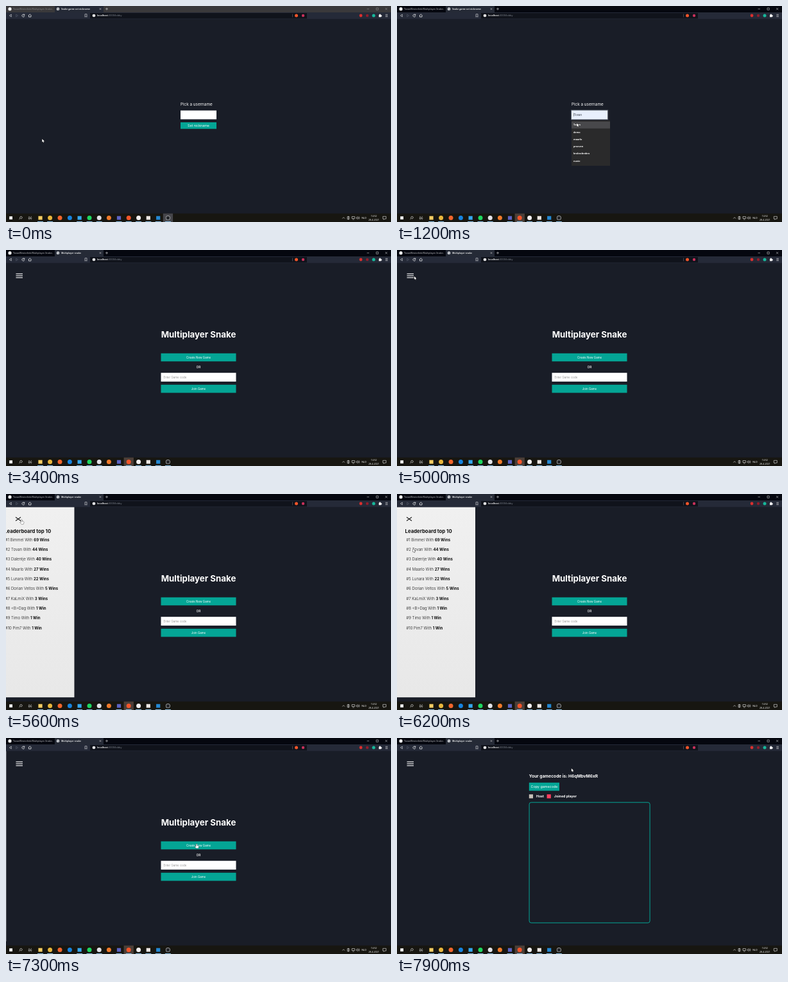
Write an HTML page with a canvas that moves like this. It is 600 px wide and 338 px high and loops after 8000 ms.

```html
<!DOCTYPE html>
<html lang="en">
<head>
<meta charset="utf-8">
<title>Multiplayer Snake</title>
<style>
html, body { margin: 0; height: 100%; overflow: hidden; background: #191d27; }
canvas { display: block; width: 600px; height: 338px; }
</style>
</head>
<body>
<canvas id="stage"></canvas>
<script>
const LOOP = 8000;
const ACTIVE = 500, FOCUS = 700, PICK = 1500, SUBMIT = 1950, LOBBY = 2800;
const MENU_OPEN = 5310, MENU_CLOSE = 6835, SLIDE = 500, GAME = 7580;
const TEAL = '#04a595', PAGE = '#191d27', PANEL_WIDTH = 122;
const UI = '"Open Sans", sans-serif', WEB = 'Inter, sans-serif';

const stage = document.getElementById('stage');
const g = stage.getContext('2d');
const ratio = window.devicePixelRatio || 1;
stage.width = 600 * ratio;
stage.height = 338 * ratio;

function rect(x, y, w, h, fill) {
  g.fillStyle = fill;
  g.fillRect(x, y, w, h);
}

function dot(x, y, r, fill) {
  g.fillStyle = fill;
  g.beginPath();
  g.arc(x, y, r, 0, 7);
  g.fill();
}

function stroke(path, color, width = 0.7) {
  g.strokeStyle = color;
  g.lineWidth = width;
  g.stroke(new Path2D(path));
}

// y is the vertical middle of the lowercase line; returns the x where the text ends
function text(str, x, y, size, { color = '#fff', weight = 400, font = WEB, align = 'left' } = {}) {
  g.font = `${weight} ${size}px ${font}`;
  g.textAlign = align;
  g.fillStyle = color;
  g.fillText(str, x, y + size * 0.34);
  return x + g.measureText(str).width;
}

const label = (str, x, y, size = 3.7, color = '#fff', weight = 400, align = 'left') =>
  text(str, x, y, size, { color, weight, align, font: UI });

function button(str, x, y, w, h, size) {
  rect(x, y, w, h, TEAL);
  text(str, x + w / 2, y + h / 2, size, { align: 'center' });
}

// CSS "ease" timing, cubic-bezier(.25, .1, .25, 1)
function ease(p) {
  if (p <= 0) return 0;
  if (p >= 1) return 1;
  let lo = 0, hi = 1, s;
  for (let i = 0; i < 20; i++) {
    s = (lo + hi) / 2;
    const x = 0.75 * s * (1 - s) + s ** 3;
    if (x < p) lo = s; else hi = s;
  }
  return 0.3 * s * (1 - s) ** 2 + 3 * s * s * (1 - s) + s ** 3;
}

function tabTitle(t) {
  if (t < SUBMIT) return 'Snake game set nickname';
  return t < LOBBY ? 'localhost:3000/lobby' : 'Multiplayer snake';
}

function browser(t) {
  const active = t >= ACTIVE, loading = t >= SUBMIT && t < LOBBY;
  const dim = active ? '#c8c9cc' : '#8d8d8f';
  rect(0, 0, 600, 10, active ? '#05070f' : '#3a393b');
  rect(76, 0, 76, 10, '#252a36');
  dot(6, 4.7, 2.6, '#f2f2f2');
  g.save();
  g.beginPath();
  g.rect(0, 0, 73, 10);
  g.clip();
  label('TovanWesterlink/Multiplayer-Snake a', 11, 4.7, 3.7, dim);
  g.restore();
  dot(81, 4.7, 2.4, '#d5d8dc');
  stroke('M79 4h2l1 1-1 2M82 2.5l1 1.5', '#59606c', 0.5);
  label(tabTitle(t), 86, 4.7, 3.6, '#fff', 600);
  stroke('M145.8 3.4l2.4 2.4m0-2.4l-2.4 2.4M155 4.6h4m-2-2v4', '#d8d8d8', 0.6);
  stroke('M562.5 4.7h3.4M577 3h3.2v3.2H577zM591 3l3.2 3.2m0-3.2L591 6.2', dim, 0.6);

  rect(0, 10, 600, 10.4, '#252a38');
  rect(131, 11, 338, 8.6, '#10131b');
  stroke('M8.3 13l-3 2 3 2z', '#e5e6e8', 0.6);
  stroke('M15.7 13l3 2-3 2z', '#596070', 0.6);
  if (loading) stroke('M25 13l4 4m0-4l-4 4', '#fff', 0.8);
  else stroke('M28.6 13.9a2 2 0 1 0 .3 1.7M28.8 12.6v1.7h-1.7', '#fff', 0.7);
  stroke('M34.8 15l2.4-2.2 2.4 2.2M35.5 14.7v2.4h3.4v-2.4', '#fff', 0.7);
  stroke('M123 12.7h3v4.6l-1.5-1.2-1.5 1.2z', '#e5e6e8', 0.6);
  dot(137, 15, 2.3, '#fff');
  stroke('M137 14.7v1.5M137 13.5v.6', '#10131b', 0.6);
  const end = label('localhost', 142, 15.1, 3.9, '#fff', 600);
  label(':3000/lobby', end, 15.1, 3.9, '#858b94');
  stroke('M446.5 12.5v5', '#747983', 0.5);
  dot(452.5, 15, 2.5, '#f4552a');
  dot(463, 15, 2.2, '#c9315c');
  dot(553, 15, 2.4, '#d9302f');
  dot(563, 15, 2.2, '#8f1d2c');
  dot(573, 15, 2.5, '#17b79a');
  rect(581, 13.6, 3.7, 3.7, '#fff');
  dot(582.8, 13.3, 0.9, '#fff');
  dot(585, 15.4, 0.9, '#fff');
  stroke('M591.3 13.3h3.6m-3.6 1.7h3.6m-3.6 1.7h3.6', '#e2e3e5', 0.6);
}

// x, colour, shape (s = square), running
const APPS = [
  [53.5, '#f5cd63', 's', 1], [68.6, '#e9b63c', 'c', 1], [84, '#f1652c', 'c', 0],
  [99.4, '#1583e0', 'c', 0], [114.6, '#35a8ee', 's', 1], [130, '#1ed760', 'c', 1],
  [145.2, '#e4e4ea', 'c', 1], [160.4, '#f07a2b', 'c', 0], [176, '#5b63c4', 's', 1],
  [191.2, '#f4552a', 'c', 1], [206.6, '#f4f1f2', 'c', 1], [221.8, '#eee8e4', 's', 1],
  [237.2, '#2489d4', 's', 1], [252.4, '#b9bbbd', 'c', 1]
];

function taskbar(t) {
  rect(0, 324.7, 600, 13.3, '#171611');
  rect(t < ACTIVE ? 244.8 : 183.6, 324.7, 15.3, 13.3, t < ACTIVE ? '#45454a' : '#4b3f39');
  rect(5.2, 329.2, 4.8, 4.8, '#fff');
  stroke('M20.5 333.8l1.6-1.7a1.7 1.7 0 1 1 .6.5', '#e8e8e8', 0.7);
  stroke('M35.3 329.6h1.3m2.2 0h1.2M35.3 333.8h1.3m2.2 0h1.2M35.3 331h3.2v1.8h-3.2zM39.8 331v1.8', '#ddd', 0.6);
  for (const [x, color, shape, running] of APPS) {
    if (shape === 's') rect(x - 3.1, 328.7, 6.2, 5.8, color);
    else dot(x, 331.6, 3.5, color);
    if (running) rect(x - 4.5, 337, 9, 1, '#86bfe6');
  }
  dot(252.4, 331.6, 2.8, '#24262a');
  stroke('M524.2 332.6l1.9-1.9 1.9 1.9', '#eee', 0.6);
  stroke('M532 329.6h3v4h-3zM533.5 328.8v5.6M539 329.5h4.4v3H539zM540 334h2.6', '#e5e5e5', 0.6);
  stroke('M545.8 330.8h1l1.3-1.2v4l-1.3-1.2h-1zM549.2 330.2q1 1.4 0 2.8M550.2 329.5q1.6 2.1 0 4.2', '#e5e5e5', 0.5);
  label('NLD', 558, 331.7, 3.8, '#fff', 400, 'center');
  label('14:52', 573.3, 328.9, 3.6, '#fff', 400, 'center');
  label('28-4-2021', 573.3, 334.4, 3.6, '#fff', 400, 'center');
  stroke('M587.3 329.3h5v3.8h-2.2l-1.2 1.2v-1.2h-1.6z', '#eee', 0.6);
}

const SUGGESTIONS = ['Tovan', 'demo', 'maarlo', 'proeven', 'brobrobrobro', 'nuvie'];

function nicknamePage(t) {
  const open = t >= FOCUS && t < PICK, filled = t >= 1100;
  text('Pick a username', 272, 153.8, 6.35);
  button('Set nickname', 272, 182, 56, 10.3, 5.3);
  if (open) rect(271, 162.5, 58.2, 15.7, '#5d626d');
  rect(272, 163.5, 56, 13.8, filled ? '#e8effc' : '#fff');
  if (filled) text(SUGGESTIONS[0], 275.8, 170.3, 4.3, { color: '#343842' });
  if (open) {
    if (t % 1000 < 500) rect(275.4, 167.6, 0.5, 5, '#222');
    rect(272, 179, 60, 71, '#2a2a2b');
    if (t >= 1100) rect(272, 180.8, 60, 10.8, '#48484b');
    SUGGESTIONS.forEach((name, i) => label(name, 275, 186.2 + i * 11.25, 3.75, '#fff', 700));
  }
  if (t >= SUBMIT) {
    rect(0, 319, 199, 5.8, '#2b303c');
    label('Wachten op localhost...', 2, 322.1, 3.6, '#e4e5e8');
  }
}

function lobbyPage() {
  text('Multiplayer Snake', 300, 132.3, 13.3, { weight: 700, align: 'center' });
  button('Create New Game', 241.5, 161.7, 117, 12.6, 4.45);
  text('OR', 300, 183.4, 4.9, { weight: 500, align: 'center' });
  rect(241.5, 192.2, 117, 13.7, '#fff');
  text('Enter Game code', 245.5, 199, 4.45, { color: '#777', weight: 300 });
  button('Join Game', 241.5, 210.8, 117, 12.7, 4.45);
}

function gamePage() {
  text('Your gamecode is: H6qMbvM6xR', 205.8, 59.8, 6.6, { weight: 700 });
  button('Copy gamecode', 205.8, 69.8, 47.2, 12.8, 5.4);
  rect(205.8, 88.2, 6.2, 6.2, '#c5c0b8');
  text('Host', 217, 91.4, 5.2, { weight: 700 });
  rect(233.6, 88.2, 6.2, 6.2, '#ff3f5f');
  text('Joined player', 244.8, 91.4, 5.3, { weight: 700 });
  g.strokeStyle = TEAL;
  g.lineWidth = 1;
  g.beginPath();
  g.roundRect(206.1, 100.8, 188, 188.4, 3);
  g.stroke();
}

const WINNERS = [
  ['Bimmel', 69], ['Tovan', 44], ['Dalentje', 40], ['Maarlo', 27], ['Lunara', 22],
  ['Dorian Veltos', 5], ['KaLmiX', 3], ['<B>Dag', 1], ['Timo', 1], ['Pim7', 1]
];

function menu(t) {
  const open = ease((t - MENU_OPEN) / SLIDE) - ease((t - MENU_CLOSE) / SLIDE);
  if (open > 0.001) {
    g.save();
    g.translate((open - 1) * PANEL_WIDTH, 0);
    const shade = g.createLinearGradient(0, 20, 0, 318);
    shade.addColorStop(0, '#f0f0f0');
    shade.addColorStop(1, '#e8e8e8');
    rect(0, 20.4, PANEL_WIDTH, 297.8, shade);
    const dark = { color: '#111' };
    text('Leaderboard top 10', 12.6, 58.5, 7.75, { ...dark, weight: 700 });
    WINNERS.forEach(([name, wins], i) => {
      const y = 71.6 + i * 15.33;
      const end = text(`#${i + 1} ${name} With `, 14.5, y, 6, { ...dark, weight: 300 });
      text(`${wins} Win${wins > 1 ? 's' : ''}`, end, y, 6, { ...dark, weight: 700 });
    });
    g.restore();
  }
  // three bars fold into a cross
  const k = t < MENU_CLOSE ? Math.min(1, open * 1.2) : Math.max(0, open * 1.25 - 0.05);
  const fold = Math.min(1, k), mix = (a, b) => a + (b - a) * fold;
  const color = open > 0.2 ? '#222' : '#fff';
  const left = mix(15.5, 15), right = mix(26, 23);
  stroke(`M${left} ${mix(37.3, 36.3)}L${right} ${mix(37.3, 42)}`, color, 1.1);
  stroke(`M${left} ${mix(43.3, 42)}L${right} ${mix(43.3, 36.3)}`, color, 1.1);
  g.globalAlpha = 1 - fold;
  stroke('M15.5 40.3H26', color, 1.1);
  g.globalAlpha = 1;
}

// time, x, y of the pointer tip
const TRACK = [
  [0, 56.3, 208], [100, 56.3, 208], [500, 286, 170], [800, 286, 171], [1150, 280, 183.5],
  [SUBMIT, 280, 183.5], [4200, 299, 130], [4300, 301, 131], [4450, 301, 131],
  [5000, 26.8, 41], [5250, 24.5, 40.5], [5700, 24.5, 40.5], [6200, 25, 86], [6400, 86, 160],
  [6650, 86, 160], [6900, 209, 136.5], [7350, 300, 167], [GAME, 300, 167], [7850, 271.8, 47.5], [LOOP, 271.8, 47.5]
];

function pointer(t) {
  if (t > SUBMIT && t < 4200) return;
  const i = TRACK.findIndex(p => p[0] > t);
  const [t0, x0, y0] = TRACK[i - 1], [t1, x1, y1] = TRACK[i];
  const p = (t - t0) / (t1 - t0), s = p * p * (3 - 2 * p);
  const hand = (t > 5150 && t < 5800) || (t > 7250 && t < GAME);
  const shape = new Path2D(hand
    ? 'M-.7 0q.7-.8 1.2 0v2.2l2.3.6q.6.2.5 1l-.4 2.6h-3.6l-1.9-2.4q.2-.8 1 -.4l.9.6z'
    : 'M0 0v5l1.2-1 .8 1.8 .9-.4-.8-1.7h1.6z');
  g.save();
  g.translate(x0 + (x1 - x0) * s, y0 + (y1 - y0) * s);
  g.lineWidth = 0.7;
  g.strokeStyle = '#000';
  g.stroke(shape);
  g.fillStyle = '#fff';
  g.fill(shape);
  g.restore();
}

function draw(now) {
  const t = now % LOOP;
  g.setTransform(ratio, 0, 0, ratio, 0, 0);
  rect(0, 0, 600, 338, PAGE);
  if (t < LOBBY) nicknamePage(t);
  else {
    if (t < GAME) lobbyPage(); else gamePage();
    menu(t);
  }
  browser(t);
  taskbar(t);
  pointer(t);
  requestAnimationFrame(draw);
}
requestAnimationFrame(draw);
</script>
</body>
</html>
```
